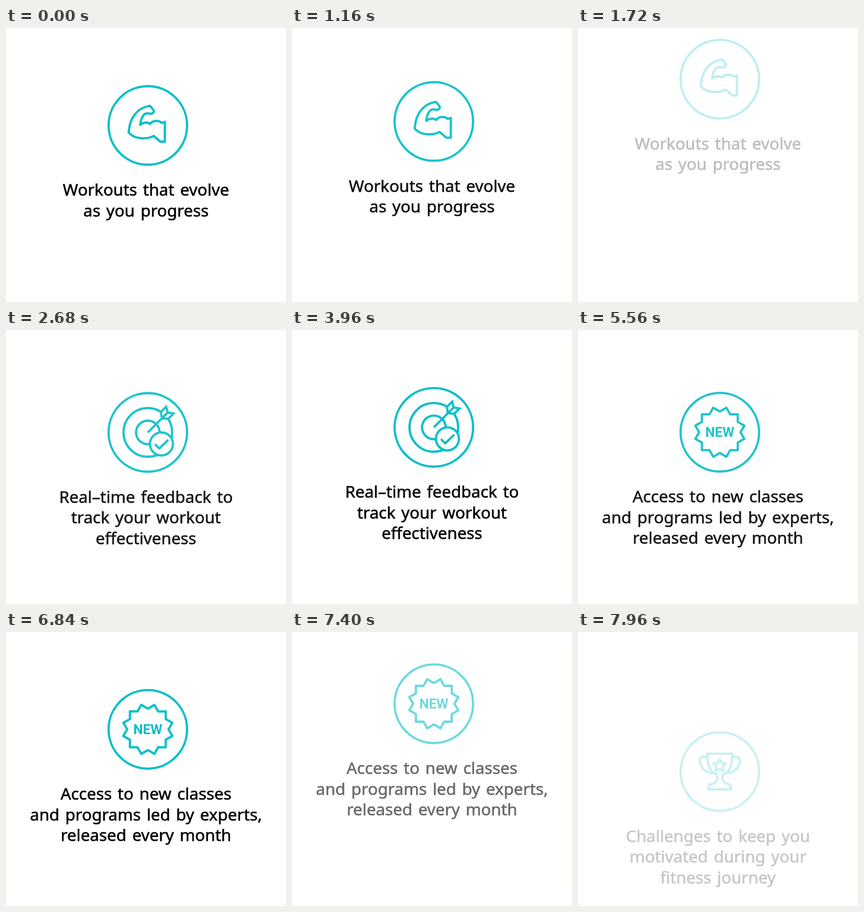
Write an HTML page that moves like this. It is 535 px wide and 523 px high and loops after 8000 ms.

```html
<!DOCTYPE html>
<html lang="en">
<head>
<meta charset="utf-8">
<title>Workout features</title>
<style>
  html, body { margin: 0; width: 100%; height: 100%; overflow: hidden; background: #fff; }
  svg { display: block; width: 100%; height: 100%; }
  .icon { fill: none; stroke: #08bfc9; stroke-width: 4.3; stroke-linejoin: round; stroke-linecap: round; }
  .icon .solid { fill: #fff; }
  .icon .sharp { stroke-linejoin: miter; stroke-linecap: butt; }
  .icon text { font: 700 26px Roboto, "Liberation Sans", sans-serif; fill: #08bfc9; stroke: none; }
  .copy { font: 400 31.4px "Noto Sans", "Open Sans", sans-serif; word-spacing: 3px;
          fill: #000; stroke: #000; stroke-width: .6; }
  text { text-anchor: middle; }
</style>
</head>
<body>
<svg id="stage" viewBox="0 0 535 523"></svg>
<script>
const LOOP = 8000, CX = 271, CY = 186;
const ENTER = { time: 1000, shift: 103 };
const EXIT = { time: 928, shift: 119.5, power: 2.05 };

// Closed star outline; phase is the angle of the first tip, in degrees.
function star(x, y, tips, outer, inner, phase) {
  const points = [];
  for (let i = 0; i < tips * 2; i++) {
    const r = i % 2 ? inner : outer;
    const a = (phase + i * 180 / tips) * Math.PI / 180;
    points.push((x + r * Math.cos(a)).toFixed(2) + ',' + (y + r * Math.sin(a)).toFixed(2));
  }
  return `<polygon points="${points.join(' ')}"/>`;
}

const circle = (x, y, r, cls = '') => `<circle cx="${x}" cy="${y}" r="${r}" class="${cls}"/>`;
const path = (d, cls = '') => `<path d="${d}" class="${cls}"/>`;

const arm = path('M235 195C237 172 250 154 271 149.5Q275 147.5 277 150.5L281.5 156.5Q284 160 280.5 162' +
  'Q278 165 274 163.2Q269 162.5 265 164C260 169 257 176 256.5 185C262 180 270 179 275 183' +
  'C280 177 292 175 297 181Q300 181 303.5 179V217H295L282 206C270 213 247 212 237 202Q233 199 235 195Z');

const target = circle(CX, CY, 46.5) + circle(CX, CY, 22.5) +
  path('M271 186L298 159', 'sharp') +
  path('M306 137L309 148L320 150L310 160L298 159L296 147Z', 'solid sharp') +
  path('M298 159L309 148', 'sharp') +
  circle(297, 208, 22, 'solid') + path('M284.5 208.5L293 216.5L310 200', 'sharp');

const badge = star(CX, CY, 12, 48.5, 39.5, 15) + `<text x="${CX}" y="195">NEW</text>`;

const trophy =
  path('M247 152H295C295 170 291 182 284 188C274 190 272 202 283 209Q293 210 293 220H249' +
       'Q249 210 259 209C270 202 268 190 258 188C251 182 247 170 247 152Z') +
  path('M247 159C240 155 233 158 233 166C234 180 246 189 258 189') +
  path('M295 159C302 155 309.5 158 309.5 166C308 180 296 189 284 189') +
  star(270.5, 174.5, 5, 12.7, 6.4, -90);

const scenes = [
  { icon: arm, lines: ['Workouts that evolve', 'as you progress'], from: -Infinity, to: 920 },
  { icon: target, lines: ['Real–time feedback to', 'track your workout', 'effectiveness'], from: 2045, to: 3920 },
  { icon: badge, lines: ['Access to new classes', 'and programs led by experts,', 'released every month'], from: 4920, to: 6800 },
  { icon: trophy, lines: ['Challenges to keep you', 'motivated during your', 'fitness journey'], from: 7795, to: Infinity }
];

const stage = document.getElementById('stage');
stage.innerHTML = scenes.map(({ icon, lines }) =>
  `<g><g class="icon">${circle(CX, CY, 75)}${icon}</g><g class="copy">` +
  lines.map((line, i) => `<text x="267.5" y="${320.3 + i * 39.5}">${line}</text>`).join('') +
  '</g></g>').join('');
scenes.forEach((scene, i) => { scene.node = stage.children[i]; });

const clamp = v => Math.min(1, Math.max(0, v));

// cubic-bezier(.25, .1, .25, 1), solved by bisection.
function ease(x) {
  let lo = 0, hi = 1;
  for (let i = 0; i < 24; i++) {
    const s = (lo + hi) / 2;
    if (.75 * s * (1 - s) + s ** 3 < x) lo = s; else hi = s;
  }
  const s = lo, q = 1 - s;
  return .3 * q * q * s + 3 * q * s * s + s ** 3;
}

function draw(t) {
  for (const { node, from, to } of scenes) {
    const shown = ease(clamp((t - from) / ENTER.time));
    const gone = clamp((t - to) / EXIT.time) ** EXIT.power;
    const y = ENTER.shift * (1 - shown) - EXIT.shift * gone;
    const alpha = shown * (1 - gone);
    node.setAttribute('transform', `translate(0 ${y.toFixed(3)})`);
    node.setAttribute('opacity', alpha.toFixed(4));
    node.setAttribute('visibility', alpha > .001 ? 'visible' : 'hidden');
  }
}

const start = performance.now();
function tick() {
  draw((performance.now() - start) % LOOP);
  requestAnimationFrame(tick);
}
tick();
</script>
</body>
</html>
```
